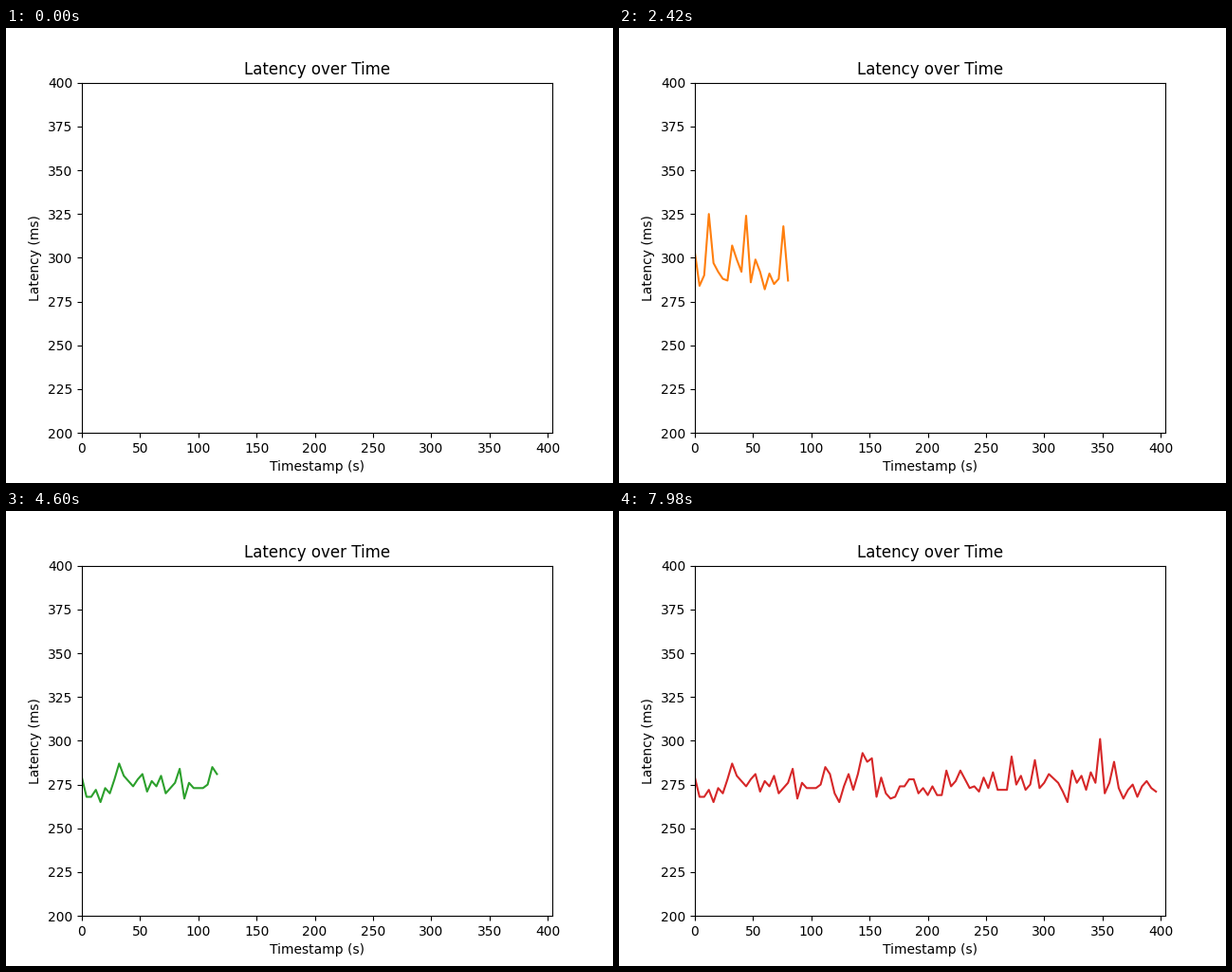
A matplotlib script for the animation above (8 s loop, 640 by 480 pixels).

```python
import matplotlib.pyplot as plt
import numpy as np
from matplotlib.animation import FuncAnimation

STEPS = 100  # frames given to each run

# One sample every 4 s, except for a gap at 308 s.
times = np.delete(np.arange(0, 400, 4), 77)


def set_peaks(values, peaks):
    """Copy of values with the peaks, given as {second: ms}, put in."""
    values = values.copy()
    values[np.searchsorted(times, list(peaks))] = list(peaks.values())
    return values


def latency(seed, base, spread, peaks):
    """Whole-millisecond jitter around a base level, with a few peaks."""
    jitter = np.random.default_rng(seed).normal(size=len(times)).clip(-1.9, 1.9)
    return set_peaks(np.round(base + spread * jitter), peaks)


first = latency(3, 316, 6, {
    0: 327, 16: 344, 32: 336, 48: 292, 56: 290, 64: 388, 88: 362, 112: 347,
    116: 364, 136: 363, 160: 337, 192: 289, 200: 291, 208: 336, 260: 376})
second = latency(5, 291, 5, {
    0: 303, 12: 325, 32: 307, 44: 324, 76: 318, 84: 317, 108: 314, 140: 327,
    144: 333, 156: 398, 172: 324, 204: 323, 236: 323, 268: 323, 300: 315})
fourth = latency(8, 274, 4.5, {
    0: 279, 32: 287, 84: 284, 112: 285, 144: 293, 148: 288, 152: 290,
    272: 291, 292: 289, 348: 301, 360: 288})
# The third run differs from the fourth only in three higher peaks.
third = set_peaks(fourth, {152: 306, 272: 308, 360: 330})

runs = [first, second, third, fourth]

fig, ax = plt.subplots(figsize=(6.4, 4.8), dpi=100)
ax.set(xlim=(0, 404), ylim=(200, 400), title="Latency over Time",
       xlabel="Timestamp (s)", ylabel="Latency (ms)")
line, = ax.plot([], [])


def update(frame):
    k, count = divmod(frame, STEPS)
    line.set_data(times[:count], runs[k][:count])
    line.set_color(f"C{k}")
    return line,


anim = FuncAnimation(fig, update, frames=STEPS * len(runs), interval=20,
                     repeat=True, repeat_delay=0)
plt.show()
```
